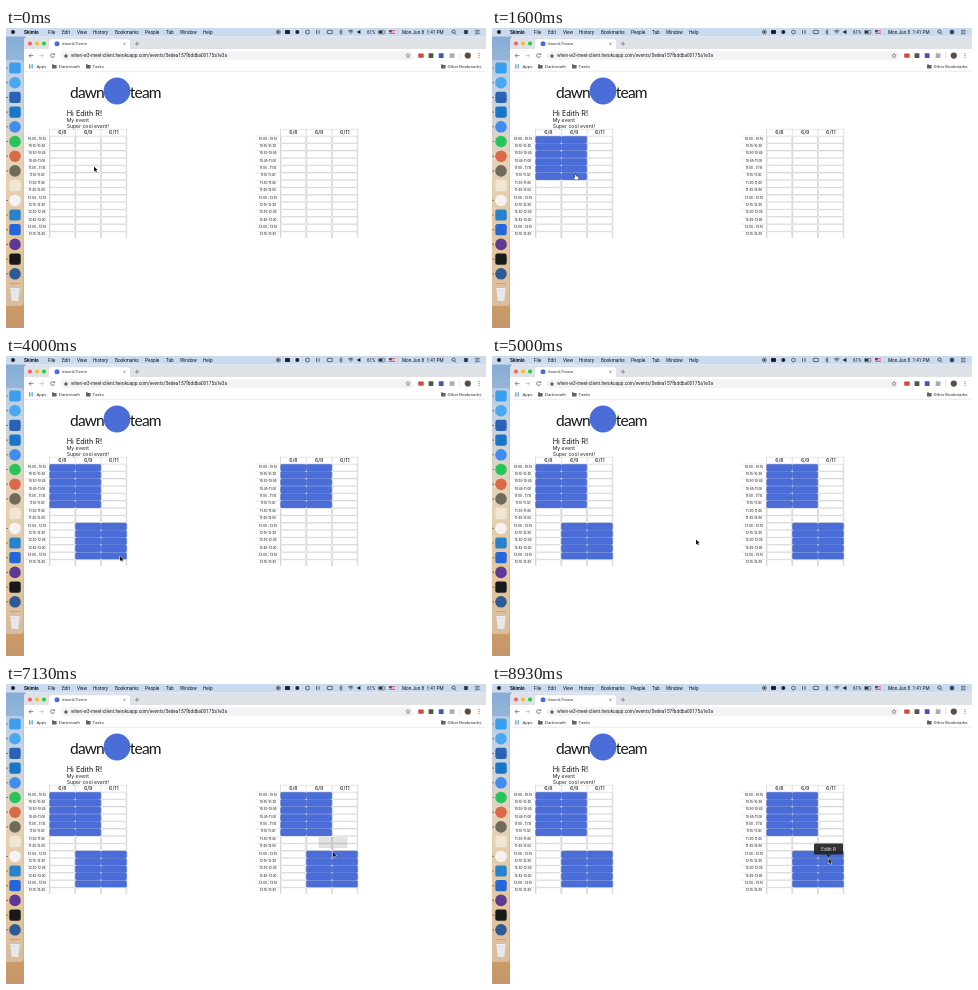
An HTML page with a canvas for the animation above (8990 ms loop, 480 by 300 pixels).

```html
<!DOCTYPE html>
<html lang="en">
<head>
<meta charset="utf-8">
<title>Availability picker</title>
<style>
  html, body { margin: 0; width: 100%; height: 100%; overflow: hidden; background: #fff; }
  canvas { display: block; width: 480px; height: 300px; }
</style>
</head>
<body>
<canvas id="stage"></canvas>
<script>
const LOOP = 8990, STEP = 200 / 3;
const BLUE = '#4a6dd8';
const UI = 'Roboto, "Open Sans", sans-serif';
const PAGE = 'Inter, Roboto, sans-serif';
const canvas = document.getElementById('stage');
const dpr = window.devicePixelRatio || 1;
canvas.width = 480 * dpr;
canvas.height = 300 * dpr;
const ctx = canvas.getContext('2d');

// Pointer tip: time, x, y
const PATH = [
  [0, 88, 138.5], [200, 82, 132], [335, 82, 132], [730, 49, 111], [870, 49, 111],
  [1600, 83, 146.5], [2205, 83, 146.5], [3130, 88, 172], [3400, 94.5, 178],
  [3666, 114, 200], [4470, 114, 200], [4730, 204, 183.5], [5270, 204, 183.5],
  [5730, 312, 152], [6200, 306, 104], [6330, 302.5, 122], [6730, 308, 146],
  [6810, 308, 146], [7300, 334, 176], [7730, 314.5, 189], [7800, 314.5, 189],
  [8470, 321, 194], [8805, 321, 194], [8930, 336.5, 174.5], [LOOP, 336.5, 174.5]
];

const ROWS = 14, ROW_H = 7.35, COL_W = 25.75, TOP = 108, BOTTOM = 210;
const LEFT_X = 43.5, RIGHT_X = 274.5;
const MORNING = [0, 0, 5, 1];      // first row, first column, last row, last column
const NOON = [8, 1, 12, 2];

function pointer(t) {
  let i = 1;
  while (i < PATH.length - 1 && PATH[i][0] < t) i++;
  const [t0, x0, y0] = PATH[i - 1], [t1, x1, y1] = PATH[i];
  const p = Math.min(1, Math.max(0, (t - t0) / (t1 - t0)));
  const e = p * p * (3 - 2 * p);
  return { x: x0 + (x1 - x0) * e, y: y0 + (y1 - y0) * e };
}

function cellAt(gridX, p) {
  return [Math.floor((p.y - TOP) / ROW_H), Math.floor((p.x - gridX) / COL_W)];
}

const within = (b, r, c) => r >= b[0] && c >= b[1] && r <= b[2] && c <= b[3];

function dragged(start, t) {
  const [r, c] = cellAt(LEFT_X, pointer(t));
  return [start[0], start[1], r, c];
}

function leftBlocks(t) {
  const list = [];
  if (t >= 930) list.push(t < 1600 ? dragged(MORNING, t) : MORNING);
  if (t >= 3460) list.push(t < 3660 ? dragged(NOON, t) : NOON);
  return list;
}

function rightBlocks(t) {
  return [...(t >= 2870 ? [MORNING] : []), ...(t >= 4995 ? [NOON] : [])];
}

function rect(x, y, w, h, color) {
  ctx.fillStyle = color;
  ctx.fillRect(x, y, w, h);
}

function round(x, y, w, h, r, fill, line, width = 0.4) {
  ctx.beginPath();
  ctx.roundRect(x, y, w, h, r);
  if (fill) { ctx.fillStyle = fill; ctx.fill(); }
  if (line) { ctx.strokeStyle = line; ctx.lineWidth = width; ctx.stroke(); }
}

function dot(x, y, r, color) {
  ctx.fillStyle = color;
  ctx.beginPath();
  ctx.arc(x, y, r, 0, 7);
  ctx.fill();
}

function ring(x, y, r, color, width = 0.7, from = 0, to = Math.PI * 2) {
  ctx.strokeStyle = color;
  ctx.lineWidth = width;
  ctx.beginPath();
  ctx.arc(x, y, r, from, to);
  ctx.stroke();
}

function line(points, color, width = 0.7) {
  ctx.strokeStyle = color;
  ctx.lineWidth = width;
  ctx.beginPath();
  points.forEach(([x, y]) => ctx.lineTo(x, y));
  ctx.stroke();
}

function poly(points, fill, edge) {
  ctx.beginPath();
  points.forEach(([x, y]) => ctx.lineTo(x, y));
  ctx.closePath();
  if (edge) { ctx.strokeStyle = edge; ctx.lineWidth = 0.9; ctx.stroke(); }
  ctx.fillStyle = fill;
  ctx.fill();
}

function text(str, x, y, size, color = '#222', { font = UI, weight = 400, align = 'left', gap = 0 } = {}) {
  ctx.font = `${weight} ${size}px ${font}`;
  ctx.letterSpacing = gap + 'px';
  ctx.textAlign = align;
  ctx.fillStyle = color;
  ctx.fillText(str, x, y);
}

function drawDesktop() {
  const g = ctx.createLinearGradient(0, 0, 0, 300);
  g.addColorStop(0, '#7fa9d6');
  g.addColorStop(0.2, '#a9c0d8');
  g.addColorStop(0.45, '#e0c08c');
  g.addColorStop(0.75, '#dfa85e');
  g.addColorStop(1, '#c3966a');
  rect(0, 0, 20, 300, g);
  round(-3, 32, 20.5, 246, 3, 'rgba(235,238,244,.4)');

  const icons = ['#3aa0ee', '#4aa8ee', '#2b62b5', '#1a76c8', '#3d8df2', '#28c45a', '#d9694a',
    '#6f6a5c', '#f0e6d2', '#f4f2f4', '#2684cf', '#2467d8', '#5b3a94', '#17181a', '#2c5a94'];
  const circles = [1, 4, 5, 6, 7, 9, 12, 14];
  icons.forEach((color, i) => {
    const y = 40 + i * 14.7;
    if (circles.includes(i)) dot(9, y, 5.8, color);
    else round(3.3, y - 5.6, 11.4, 11.2, 2.2, color);
    if (i !== 8) dot(1.1, y, 0.6, '#333');
  });
  line([[4, 255.5], [14, 255.5]], 'rgba(90,90,90,.5)', 0.5);
  poly([[4.5, 261], [13.5, 261], [12.3, 273], [5.7, 273]], '#e6e8ea');
  round(4, 260, 10, 1.8, 0.9, '#f7f7f8', '#b9bdc1');
}

function drawMenuBar() {
  rect(0, 0, 480, 8.6, '#cbdbef');
  dot(7, 4, 2, '#222');
  const items = [['File', 42], ['Edit', 56], ['View', 71], ['History', 87], ['Bookmarks', 109],
    ['People', 139], ['Tab', 160], ['Window', 174], ['Help', 197]];
  text('Skimlo', 18, 5.6, 4.7, '#111', { weight: 700 });
  items.forEach(([label, x]) => text(label, x, 5.6, 4.7, '#111'));

  ring(272.3, 4, 2, '#333', 0.6);
  dot(272.3, 4, 1, '#222');
  round(279, 2, 5, 4, 0.8, '#222');
  dot(291.3, 4, 2, '#222');
  ring(301.5, 4, 1.9, '#333');
  line([[310.6, 2], [310.6, 6]], '#333');
  line([[313, 2], [313, 6]], '#333');
  round(321.3, 2.3, 5, 3.3, 0.4, null, '#333', 0.7);
  line([[333.5, 2.8], [336.3, 5.3], [335, 6.5], [335, 1.5], [336.3, 2.8], [333.5, 5.3]], '#222', 0.5);
  [1, 2.4, 3.8].forEach(r => ring(344.8, 6, r, '#222', 0.7, -2.3, -0.85));
  poly([[351.5, 3], [352.8, 3], [354.4, 1.8], [354.4, 6.2], [352.8, 5], [351.5, 5]], '#222');
  text('61%', 361, 5.6, 4.5, '#111');
  round(372.5, 2.4, 6.4, 3.4, 0.6, null, '#333', 0.5);
  rect(373, 2.9, 3.5, 2.4, '#333');
  rect(383, 2.2, 6, 3.9, '#f4f4f4');
  for (let i = 0; i < 3; i++) rect(383, 2.2 + i * 1.5, 6, 0.7, '#c23b46');
  rect(383, 2.2, 2.7, 2, '#34488c');
  text('Mon Jun 8  1:41 PM', 396, 5.6, 4.7, '#111');
  ring(447.5, 3.6, 1.6, '#222');
  line([[448.7, 4.8], [450.2, 6.3]], '#222');
  dot(460, 4, 2.3, '#39405a');
  [2.3, 4, 5.7].forEach(y => line([[469, y], [473.5, y]], '#222', 0.6));
}

function folder(x, y) {
  round(x, y, 4.6, 3.4, 0.5, '#5f6368');
  rect(x, y - 0.6, 2, 0.9, '#5f6368');
}

function drawBrowser() {
  round(18, 9, 466, 295, [3, 0, 0, 0], '#dee1e6');
  ['#fb5e57', '#fbbd2e', '#2bc840'].forEach((c, i) => dot(24 + i * 7, 15.5, 2, c));
  round(43, 11.3, 81, 12, [2.5, 2.5, 0, 0], '#fff');
  dot(51, 15.8, 2.5, BLUE);
  text('dawnk7team', 56, 17.4, 4.4, '#3c4043');
  line([[117.3, 14.5], [119.7, 17]], '#555', 0.5);
  line([[119.7, 14.5], [117.3, 17]], '#555', 0.5);
  line([[129, 15.8], [133, 15.8]], '#555', 0.6);
  line([[131, 13.8], [131, 17.8]], '#555', 0.6);

  rect(18, 21, 462, 279, '#fff');
  line([[27.4, 27.6], [23.2, 27.6], [25.1, 25.6]], '#555');
  line([[23.2, 27.6], [25.1, 29.6]], '#555');
  line([[33.5, 27.6], [37.7, 27.6], [35.8, 25.6]], '#bbb');
  line([[37.7, 27.6], [35.8, 29.6]], '#bbb');
  ring(46.5, 27.6, 1.9, '#555', 0.7, 0.2, 5.3);
  poly([[46.9, 26.9], [48.9, 26.9], [48.9, 25.1]], '#555');

  round(54.5, 23.2, 352.5, 9, 4.5, '#f1f3f4');
  round(58.6, 27.1, 2.8, 2.4, 0.3, '#555');
  ring(60, 26.9, 0.9, '#555', 0.5, Math.PI, 0);
  text('when-w3-meet-client.herokuapp.com/events/5edea157fbddba00175a1e3a', 65, 29.4, 4.7, '#222');
  const star = Array.from({ length: 10 }, (_, i) => {
    const a = i * Math.PI / 5 - Math.PI / 2, r = i % 2 ? 1 : 2.3;
    return [402 + r * Math.cos(a), 27.7 + r * Math.sin(a)];
  });
  line([...star, star[0]], '#555', 0.5);
  round(412.2, 25.5, 5.5, 4.2, 0.4, '#d54a40');
  round(422.6, 25.2, 4.8, 4.8, 0.6, '#4b5a50');
  round(432.8, 25.2, 4.8, 4.8, 0.6, '#3f59b4');
  round(443.7, 25.2, 4.8, 4.8, 0.6, '#a9adb8');
  line([[453.5, 24.5], [453.5, 31]], '#ccc', 0.5);
  dot(461.8, 27.6, 3.1, '#5f4a42');
  [25.6, 27.6, 29.6].forEach(y => dot(473, y, 0.6, '#c5533e'));

  const apps = ['#e34b3e', '#35a152', '#4285f0'];
  for (let i = 0; i < 9; i++) rect(23 + i % 3 * 1.5, 36.4 + (i / 3 | 0) * 1.5, 1, 1, apps[i % 3]);
  text('Apps', 30.5, 40.1, 4.4, '#333');
  folder(46, 37);
  text('Dartmouth', 53, 40.1, 4.4, '#333');
  folder(80, 37);
  text('Tasks', 86.5, 40.1, 4.4, '#333');
  folder(435, 37);
  text('Other Bookmarks', 441.5, 40.1, 4.4, '#333');
  line([[18, 43.3], [480, 43.3]], '#dcdee0', 0.6);
}

function drawHeading() {
  const logo = { font: 'Lato, sans-serif', gap: -0.8 };
  text('dawn', 64, 69.5, 15.5, '#151515', logo);
  dot(111, 63, 13.4, BLUE);
  text('team', 123.8, 69.5, 15.5, '#151515', logo);
  text('Hi Edith R!', 60.7, 87.6, 7.3, '#111', { font: PAGE });
  text('My event', 60.7, 94.2, 5.1, '#222', { font: PAGE });
  text('Super cool event!', 60.7, 100.2, 5.1, '#222', { font: PAGE });
}

function clock(quarter) {
  return `${10 + (quarter >> 2)}:${String(quarter % 4 * 15).padStart(2, '0')}`;
}

function drawGrid(x, blocks) {
  ctx.save();
  ctx.beginPath();
  ctx.rect(0, 0, 480, BOTTOM);
  ctx.clip();
  ['6/8', '6/9', '6/11'].forEach((day, c) =>
    text(day, x + (c + 0.5) * COL_W, 106.2, 5.3, '#111', { font: PAGE, align: 'center' }));
  line([[x, 101.3], [x + 3 * COL_W, 101.3]], '#ccc', 0.5);
  for (let c = 0; c < 4; c++) {
    const lx = x + c * COL_W;
    line([[lx, 101], [lx, BOTTOM]], '#bcbcbc', 0.5);
  }
  for (let r = 0; r < ROWS; r++) {
    const y = TOP + r * ROW_H;
    const dash = r % 4 ? '-' : ' - ';
    text(clock(r) + dash + clock(r + 1), x - 12.5, y + 3.7, 3, '#222', { font: PAGE, weight: 500, align: 'center' });
    line([[x - 25, y], [x, y]], '#d8d8d8', 0.5);
    for (let c = 0; c < 3; c++) {
      const on = blocks.some(b => within(b, r, c));
      const pad = on ? 0.15 : 0.5;
      round(x + c * COL_W + pad, y + 0.2, COL_W - 2 * pad, ROW_H - 0.4, 1.4,
        on ? BLUE : '#fff', on ? '#4766cc' : '#bcbcbc', 0.45);
    }
  }
  ctx.restore();
}

function drawArrow({ x, y }) {
  const shape = [[0, 0], [0, 5], [1.2, 4], [2, 5.8], [2.9, 5.4], [2.1, 3.7], [3.6, 3.6]];
  poly(shape.map(([a, b]) => [x + a, y + b]), '#111', '#fff');
}

function drawHand({ x, y }) {
  const shape = [[0, 0.6], [0.9, 0.6], [1.1, 1.8], [3.5, 2.3], [3.4, 4.1], [2.8, 5.2], [0.2, 5.2], [-1.4, 3.2], [-0.9, 2.7], [0, 3.2]];
  poly(shape.map(([a, b]) => [x + a, y + b]), '#fff', '#222');
}

function overFilled(t) {
  const [r, c] = cellAt(RIGHT_X, pointer(t));
  return rightBlocks(t).some(b => within(b, r, c));
}

function drawTip(t, p) {
  let age = 0;
  while (age < 5 && overFilled(t - age * STEP)) age++;
  if (!age) return;
  ctx.globalAlpha = 0.92 * (age / 5) ** 1.2;
  round(p.x - 14.5, p.y - 15, 29, 11, 1.2, '#222');
  poly([[p.x - 2.6, p.y - 4.1], [p.x + 2.6, p.y - 4.1], [p.x, p.y - 1.4]], '#222');
  text('Edith R', p.x, p.y - 8, 4.4, '#fff', { font: PAGE, align: 'center' });
  ctx.globalAlpha = 1;
}

function draw(t) {
  ctx.setTransform(dpr, 0, 0, dpr, 0, 0);
  rect(0, 0, 480, 300, '#fff');
  drawDesktop();
  drawBrowser();
  drawMenuBar();
  drawHeading();
  drawGrid(LEFT_X, leftBlocks(t));
  drawGrid(RIGHT_X, rightBlocks(t));
  if (t >= 3190 && t < 3460) {
    round(LEFT_X + COL_W + 0.5, TOP + 8 * ROW_H + 0.2, COL_W - 1, ROW_H - 0.4, 0.5, null, '#8ea0dc', 0.6);
    round(85.2, 171.6, 5.4, 3.2, 0.3, null, '#9dade3', 0.6);
  }
  const p = pointer(t);
  drawTip(t, p);
  (t >= 930 && t < 2270 ? drawHand : drawArrow)(p);
}

const begin = performance.now();
function tick() {
  const t = (performance.now() - begin) % LOOP;
  draw(Math.floor((t + 4) / STEP) * STEP);
  requestAnimationFrame(tick);
}
tick();
</script>
</body>
</html>
```
